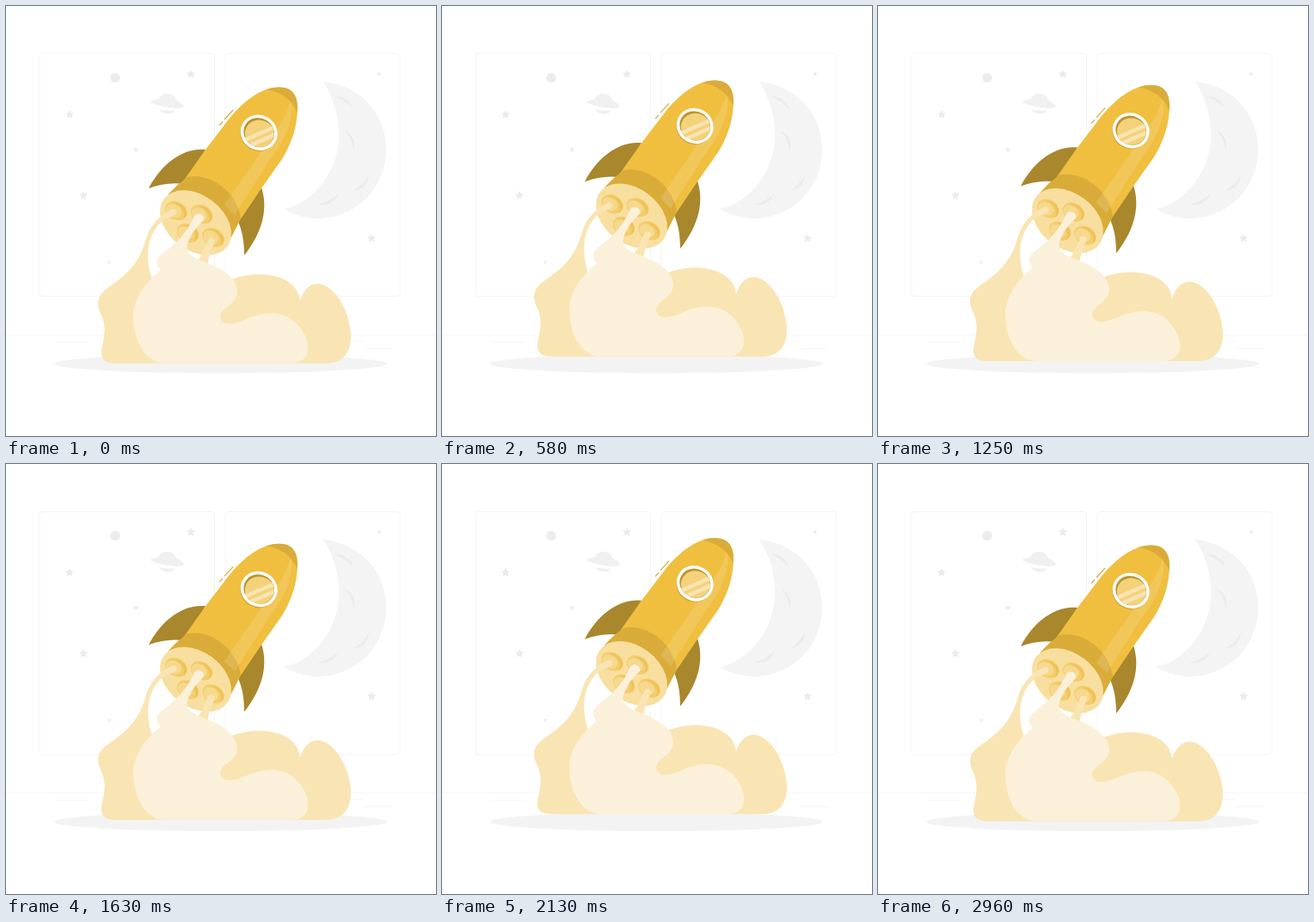
An HTML page that plays this animation: 500x500 px, repeating every 3000 ms.

```html
<!DOCTYPE html>
<html lang="en">
<head>
<meta charset="utf-8">
<title>Rocket launch</title>
<style>
  html, body { margin: 0; width: 100%; height: 100%; overflow: hidden; background: #fff; }
  svg { display: block; width: 100%; height: 100%; }
</style>
</head>
<body>
<svg viewBox="0 0 500 500">
  <defs>
    <path id="star" d="M0-5 1.6-1.8 5-1.5 2.5 1 3.1 4.5 0 2.9-3.1 4.5-2.5 1-5-1.5-1.6-1.8Z"/>
    <g id="nozzle" transform="rotate(30)">
      <ellipse rx="13.5" ry="10.3" fill="#f3cd6c"/>
      <ellipse cx="-2.5" cy="1.5" rx="9.5" ry="7.3" fill="#f6d98e"/>
      <path d="M-9-5A13 10 0 0 1 11 5A12 9 0 0 0-9-5Z" fill="#eec257"/>
    </g>
    <clipPath id="glass"><ellipse cx="294" cy="147.2" rx="18" ry="16.6" transform="rotate(31 294 147.2)"/></clipPath>
  </defs>

  <!-- room and sky -->
  <g fill="none" stroke="#f5f5f5">
    <rect x="39" y="55.5" width="203.5" height="282" rx="3"/>
    <rect x="255" y="55.5" width="203" height="282" rx="3"/>
    <path d="M0 382.5H500M56 391H97M416 398.5H449M402 390H416" stroke="#f7f7f7"/>
  </g>
  <path fill="#f4f4f4" d="M369 88C412 92 442 125 442 167C442 212 407 247 363 247C348 247 335 243 323 236C360 228 387 190 387 150C387 127 381 107 369 88Z"/>
  <g fill="#ebebeb">
    <path d="M382 105C391 104 401 110 404 120C398 113 391 109 382 105Z"/>
    <path d="M393 145C403 149 408 159 404 168C403 158 400 151 393 145Z"/>
    <path d="M422 195C422 206 415 214 405 214C412 210 418 204 422 195Z"/>
    <path d="M386 218C383 228 373 233 362 231C372 229 380 224 386 218Z"/>
  </g>
  <g fill="#f0f0f0">
    <path d="M168 111.5C171 109 174 109 177 109C179 104 183 102 187.500 102C193 102 197 105 198.500 110C204 113 207 115 207 117C204 120 192 119 183 117C174 115 169 113 168 111.500Z"/>
    <path d="M178 120C184 121.500 191 122 196.500 121.500C194 127 182 127 178 120Z"/>
  </g>
  <circle cx="127" cy="83.500" r="5.700" fill="#ececec"/>
  <g id="stars" fill="#ebebeb"></g>
  <ellipse cx="249.500" cy="416" rx="193.500" ry="11" fill="#f3f3f3"/>

  <g id="rocket">
    <g fill="#a8872d">
      <path d="M232 167C205 164 180 185 166 212C180 207 192 205 208 207Z"/>
      <path d="M297 211C304 232 301 260 277 290C277 275 275 262 270 251Z"/>
    </g>
    <path fill="#f0bf40" d="M186 223L203 208L232 167L258 133C280 105 302 93 320 94.500C332 95.500 339 103 339 117C339 140 332 160 321 178L297 212L272 249L262 269Z"/>
    <path fill="#d9ac3a" d="M185 225C190 216 200 207 211 199C238 193 269 217 273 247L261 270Z"/>
    <path fill="#fff" opacity=".13" d="M331 109C337 130 322 160 306 180L266 243L254 231L300 165C318 140 328 125 331 109Z"/>
    <path fill="#d9ac3a" d="M303 97C311 94 318 94 324 95C334 97 340 106 338.700 124C333 110 321 100 303 97Z"/>
    <path d="M248 139L252 134.500M254 132L264 121" stroke="#d9ac3a" stroke-width="1.200"/>

    <ellipse cx="293" cy="149" rx="21" ry="19.500" transform="rotate(31 293 149)" fill="#d0a438"/>
    <g clip-path="url(#glass)">
      <path fill="#bb9432" d="M270 125H320V170H270Z"/>
      <ellipse cx="295.500" cy="149.500" rx="18" ry="16.500" transform="rotate(31 295.500 149.500)" fill="#f4d27a"/>
      <path d="M275 157L314 140M282 163L316 148" stroke="#f9e4b2" stroke-width="4.500"/>
    </g>
    <ellipse cx="294.200" cy="147.200" rx="20" ry="18.600" transform="rotate(31 294.200 147.200)" fill="none" stroke="#fff" stroke-width="3.500"/>

    <ellipse cx="220.500" cy="252" rx="46" ry="32" transform="rotate(37 220.500 252)" fill="#f8dfa0"/>
    <use href="#nozzle" x="0" y="0" transform="translate(198 238)"/>
    <use href="#nozzle" transform="translate(227.500 242)"/>
    <use href="#nozzle" transform="translate(211.500 264)"/>
    <use href="#nozzle" transform="translate(241 269)"/>

    <g fill="#f9e5b3">
      <path d="M194 236C180 242 168 254 163 270C155 300 140 312 125 323C108 334 104 342 109 355C117 371 115 380 112 395C109 408 112 415.500 128 415.500H372C394 415.500 402 400 401 380C398 350 380 323 362 323C352 323 345 332 342 343C340 320 315 311 290 312C277 313 267 316 259 319L230 340L170 318C161 292 164 264 183 249C188 246 193 245 197 243A4 4 0 0 0 194 236Z"/>
      <path d="M235 272A4.300 4.300 0 0 1 243 274C238 285 235 292 234 304L220 300C228 290 231 283 235 272Z"/>
    </g>
    <path fill="#fbf1da" d="M219 244C212 261 200 274 187 284C175 293 172 298 180 307C165 319 148 338 148 362C149 392 163 415.500 186 415.500H332C355 415 356 392 342 374C325 352 300 355 280 364C262 372 250 372 249 361C250 350 268 348 269 332C268 315 250 305 232 298C215 291 207 287 212 274C216 263 224 255 230 249A6.200 6.200 0 0 0 219 244Z"/>
  </g>
</svg>
<script>
  const stars = [[74, 126, 1], [215, 79, 1], [90, 220, 1], [425, 270, 1], [151, 167, .6], [434, 79, .5], [120, 298, .45]];
  document.getElementById('stars').innerHTML = stars.map(([x, y, s]) =>
    `<use href="#star" transform="translate(${x} ${y}) scale(${s})"/>`).join('');

  const rocket = document.getElementById('rocket');
  const LOOP = 1500, PEAK = 712, LAND = 1430, HEIGHT = 9.5, STEP = 1000 / 24;

  // Linear climb, linear descent, short rest on the ground.
  function lift(t) {
    if (t < PEAK) return HEIGHT * t / PEAK;
    return HEIGHT * Math.max(0, (LAND - t) / (LAND - PEAK));
  }

  const start = performance.now();
  function draw() {
    const elapsed = performance.now() - start;
    const t = Math.floor((elapsed + 5) / STEP) * STEP % LOOP;
    rocket.setAttribute('transform', `translate(0 ${-lift(t)})`);
    requestAnimationFrame(draw);
  }
  draw();
</script>
</body>
</html>
```
